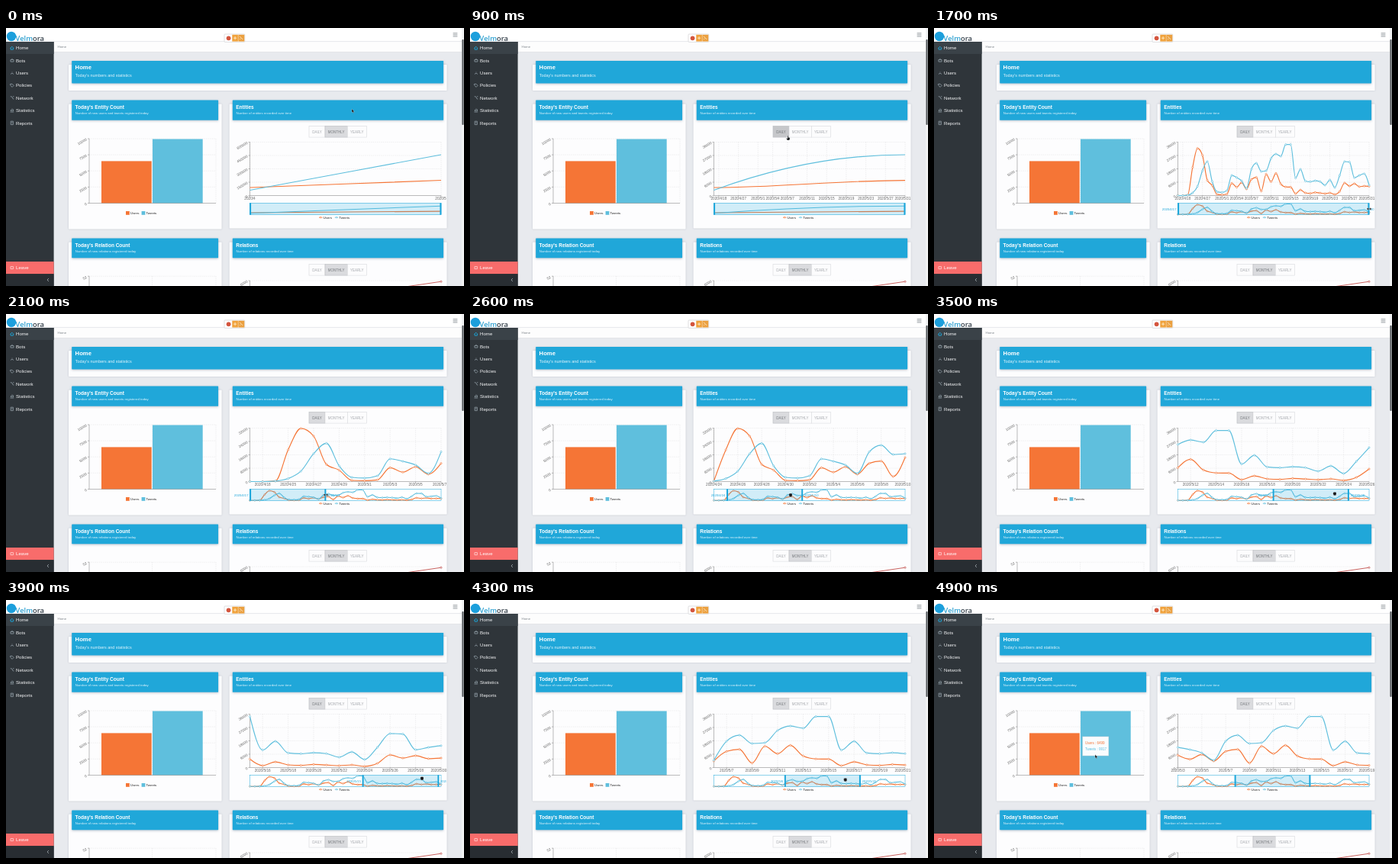
These frames come from a looping animation (600x338 px, 5 s). An HTML page:

```html
<!DOCTYPE html>
<html lang="en">
<head>
<meta charset="utf-8">
<title>Dashboard</title>
<style>
  html, body { margin: 0; width: 100%; height: 100%; overflow: hidden; background: #e8eaee; }
  svg { display: block; width: 100vw; height: 100vh; font-family: "Liberation Sans", Arial, sans-serif; }
  .card { fill: #fdfdfe; filter: drop-shadow(0 .5px 1px rgba(60, 70, 90, .22)); }
  .head { fill: #20a7d9; filter: drop-shadow(0 1.5px 1.5px rgba(40, 60, 90, .3)); }
  .title { fill: #fff; font-weight: bold; }
  .sub { fill: #e4f5fc; }
  .grid { stroke: #d3d3d6; stroke-width: .4; stroke-dasharray: 1.3 1.3; fill: none; }
  .axis { stroke: #777; stroke-width: .5; fill: none; }
  .tick { fill: #666; font-size: 4.7px; }
  .key { fill: #222; font-size: 4.4px; }
  .icon { fill: none; stroke: #8a969e; stroke-width: .9; }
</style>
</head>
<body>
<svg viewBox="0 0 600 338" preserveAspectRatio="none">
  <g id="page"></g>
  <g id="live"></g>
</svg>
<script>
const ORANGE = '#f57536', BLUE = '#5fbfdd', ACCENT = '#1ba6da';
const LOOP = 5000, STEP = 100;
const X0 = 319.5, X1 = 570, Y0 = 219.5, Y1 = 149.5;

// Daily counts in thousands
const users = [0, 0, .3, 19, 31.8, 27.2, 10.3, 6.8, .7, .5, 1, 8.3, 5.6, 8.8, 4.4, 10.9, 12.3, 3, 14.4, 9.3,
  15, 7.8, 5.8, 5.7, 1.3, 3.8, 1.8, 1.5, 2.1, 1.7, 1.3, 1.8, .8, 2.8, 8.5, 6.4, 8, 6, 6.4, 6.2];
const tweets = [0, 0, .3, 1.8, 6.2, 16.7, 22.9, 9.4, 2.5, 2.1, 3.4, 13.6, 12.1, 9.9, 4.9, 17.8, 21.8, 16.2, 16.7, 25,
  28, 26.5, 34.4, 34.4, 11.8, 17.7, 9.8, 9.3, 10, 9.4, 7, 10.5, 5.4, 13.6, 22.9, 22.6, 12, 13.6, 14.7, 7];
const LAST = users.length - 1;
const monthly = [[90, 171], [60, 459]];
const daily = [users, tweets];

const lerp = (a, b, k) => a + (b - a) * k;
const clamp = (v, a, b) => Math.min(b, Math.max(a, v));
const ease = k => k * k * (3 - 2 * k);

// keys: rows of [time, value, value, ...]
function track(keys, t) {
  let i = 0;
  while (i < keys.length - 2 && t >= keys[i + 1][0]) i++;
  const a = keys[i], b = keys[i + 1], k = clamp((t - a[0]) / (b[0] - a[0]), 0, 1);
  return a.slice(1).map((v, j) => lerp(v, b[j + 1], k));
}

const rect = (x, y, w, h, fill, more = '') =>
  `<rect x="${x}" y="${y}" width="${w}" height="${h}" fill="${fill}" ${more}/>`;
const text = (x, y, s, more = '') => `<text x="${x}" y="${y}" ${more}>${s}</text>`;
const path = (d, more) => `<path d="${d}" ${more}/>`;
const tilted = (x, y, s) => text(0, 0, s, `class="tick" text-anchor="end" transform="translate(${x} ${y}) rotate(-30)"`);

function card(x, y, w, h, headH, title, sub, big) {
  const ty = y + (big ? 11 : 11.3), sy = big ? y + 21.2 : y + 18.2;
  return rect(x, y + 5, w, h, '#fff', 'class="card" rx="1"') +
    rect(x + 4.2, y, w - 8.7, headH, '', 'class="head" rx=".6"') +
    text(x + 8.6, ty, title, `class="title" font-size="${big ? 7.7 : 6.5}"`) +
    text(x + 8.8, sy, sub, `class="sub" font-size="${big ? 5.44 : 4.35}"`);
}

function buttons(y, on, hover) {
  return [['DAILY', 397, 21], ['MONTHLY', 418, 29.3], ['YEARLY', 447.3, 25]].map(([s, x, w], i) =>
    rect(x, y, w, 14.6, i === on ? (hover ? '#c6c7ca' : '#dadbde') : '#fcfcfd',
      `stroke="${i === on ? '#b9bcc0' : '#d9dbde'}" stroke-width=".6"`) +
    text(x + w / 2, y + 9, s, `text-anchor="middle" font-size="4.5" fill="${i === on ? '#74777b' : '#a5a8ac'}"`)
  ).join('');
}

function sidebar() {
  const marks = [
    'M5.5 26.5L7.8 24.2L10 26.5M6.2 26v2.2h3.2v-2.2',
    'M6 41.5h4v2.6h-4zM8 41.5v-1.6',
    'M6 60.5q2-3 4 0M8 57.6v.6',
    'M5.6 73.4h2.6l2 2l-2 2l-2.6-2.4z',
    'M5.8 89.8h1.6l2 3.2h1M9 89.8h1.4',
    'M5.6 110h4.6M6.5 109v-2M8 109v-3.4M9.5 109v-2.5',
    'M6.2 122.2h3.2v4.4h-3.2zM7 124h1.6'
  ];
  return rect(0, 18, 62.6, 320, '#2f353a') + rect(0, 18, 62.6, 16, '#3a4248') +
    ['Home', 'Bots', 'Users', 'Policies', 'Network', 'Statistics', 'Reports'].map((s, i) =>
      text(13, 28.1 + i * 16.4, s, 'font-size="6.15" fill="#f4f5f6"') +
      path(marks[i], `class="icon" ${i ? '' : `style="stroke:${ACCENT}"`}`)).join('') +
    rect(0, 306, 62.6, 16.2, '#f86c6b') + text(13, 316.3, 'Leave', 'font-size="6.15" fill="#fff"') +
    path('M6 312.6h3.6v3h-3.6z', 'fill="none" stroke="#ffc9c8" stroke-width=".9"') +
    rect(0, 322.2, 62.6, 15.8, '#282d32') +
    path('M56 328l-2 2l2 2', 'fill="none" stroke="#a3abb0" stroke-width=".8"');
}

function barChart() {
  let s = path('M191.5 145V229.5M275 145V229.5' + [0, 1, 2, 3].map(i => `M109 ${145 + i * 21.1}H275`).join(''), 'class="grid"');
  s += rect(125, 174.4, 65.7, 55.1, ORANGE) + rect(192, 145.5, 65.7, 84, BLUE);
  s += path('M109 145V229.5H275' + [0, 1, 2, 3, 4].map(i => `M107 ${145 + i * 21.12}h2`).join(''), 'class="axis"');
  [10000, 7500, 5000, 2500, 0].forEach((v, i) => s += tilted(106.3, 147 + i * 21.12, v));
  return s + rect(157, 240, 4.8, 4.8, ORANGE) + text(163, 244, 'Users', 'class="key"') +
    rect(177.6, 240, 4.8, 4.8, BLUE) + text(183.4, 244, 'Tweets', 'class="key"');
}

function page() {
  let s = rect(0, 0, 600, 338, '#e8eaee') + rect(0, 0, 600, 17.6, '#fff') + rect(62.6, 17.6, 537.4, .5, '#d4d8dc') +
    rect(62.6, 18.1, 537.4, 13.4, '#fdfdfd') + rect(62.6, 31.2, 537.4, .5, '#d4d8dc') +
    text(67.5, 26.2, 'Home', 'font-size="4.4" fill="#7d848a"');
  s += '<circle cx="7" cy="11" r="6.2" fill="#1c9fdc"/>' +
    '<text x="12.6" y="16.8" font-size="9.3" font-weight="600" font-family="Open Sans, sans-serif" fill="#2a9fd0">Velm<tspan fill="#35414b">ora</tspan></text>';
  s += path('M585.6 6.8h5.8M585.6 8.9h5.8M585.6 11h5.8', 'stroke="#8b9197" stroke-width=".9"');
  s += rect(286, 8, 26.8, 10.4, '#fff', 'rx="1" stroke="#c9cbce" stroke-width=".6"') +
    '<circle cx="291.6" cy="13.3" r="2.9" fill="#d4553e"/>' +
    rect(296.3, 8.8, 7.6, 8.8, '#f0a23c') + rect(304.3, 8.8, 8, 8.8, '#eba040') +
    path('M300.1 11v4.4M298 13.2h4.2M306.2 11l4 4M306.2 15l1.2-1.2', 'stroke="#fff3d8" stroke-width=".8"');
  s += sidebar();
  s += card(82, 43, 495.6, 34, 29.4, 'Home', 'Today\'s numbers and statistics', true) +
    card(82, 94.5, 200.6, 164, 26.3, 'Today\'s Entity Count', 'Number of new users and tweets registered today') +
    card(292.6, 94.5, 285, 163, 26.3, 'Entities', 'Number of entities recorded over time') +
    card(82, 275.4, 200.6, 90, 25.8, 'Today\'s Relation Count', 'Number of new relations registered today') +
    card(292.6, 275.4, 285, 90, 25.8, 'Relations', 'Number of relations recorded over time');
  s += barChart() + buttons(309.5, 1);
  s += path('M109 325.2H275M191.5 325.2V338M275 325.2V338M319.5 331H570M570 331V338', 'class="grid"') +
    path('M109 325.2V338M107 325.2h2M319.5 331V338M317.5 331h2', 'class="axis"') +
    tilted(106.3, 327.4, '52') + tilted(317, 333, '6000') +
    path('M526 338.6L570 332.2', 'stroke="#c2504c" stroke-width=".9" fill="none"') +
    '<circle cx="570" cy="332.2" r="1.1" fill="#fff" stroke="#c2504c" stroke-width=".7"/>';
  [[410, ORANGE, 'Users'], [430.8, BLUE, 'Tweets']].forEach(([x, c, name]) => {
    s += path(`M${x} 248.2h4.4`, `stroke="${c}" stroke-width=".8"`) +
      `<circle cx="${x + 2.2}" cy="248.2" r=".9" fill="#fff" stroke="${c}" stroke-width=".6"/>` +
      text(x + 5.4, 249.8, name, 'class="key"');
  });
  return s + rect(597, 0, 3, 338, '#f1f2f3') + rect(597.4, 15, 2.2, 112, '#55595d', 'rx="1"');
}

// Monotone cubic through the points
function curve(p) {
  const n = p.length, m = [], h = [], g = [];
  for (let i = 0; i < n - 1; i++) {
    h[i] = p[i + 1][0] - p[i][0];
    g[i] = (p[i + 1][1] - p[i][1]) / h[i];
  }
  for (let i = 1; i < n - 1; i++) {
    const mid = (g[i - 1] * h[i] + g[i] * h[i - 1]) / (h[i - 1] + h[i]);
    m[i] = (Math.sign(g[i - 1]) + Math.sign(g[i])) * Math.min(Math.abs(g[i - 1]), Math.abs(g[i]), Math.abs(mid) / 2);
  }
  m[0] = n > 2 ? (3 * g[0] - m[1]) / 2 : g[0];
  m[n - 1] = n > 2 ? (3 * g[n - 2] - m[n - 2]) / 2 : g[0];
  let d = `M${p[0][0].toFixed(2)} ${p[0][1].toFixed(2)}`;
  for (let i = 0; i < n - 1; i++) {
    const k = h[i] / 3, [x, y] = p[i], [u, v] = p[i + 1];
    d += 'C' + [x + k, y + k * m[i], u - k, v - k * m[i + 1], u, v].map(a => a.toFixed(2)).join(' ');
  }
  return d;
}

function plot(data, top, bottom, max) {
  return data.map((v, i) => [lerp(X0, X1, i / (data.length - 1)), lerp(bottom, top, v / max)]);
}

function series(p, color, width, r) {
  const dots = r ? p.map(([x, y]) => `<circle cx="${x.toFixed(2)}" cy="${y.toFixed(2)}" r="${r}"/>`).join('') : '';
  return path(curve(p), `fill="none" stroke="${color}" stroke-width="${width}"`) +
    `<g fill="#fff" stroke="${color}" stroke-width=".65">${dots}</g>`;
}

// Each new point grows out of the old point that shares its part of the list
function morph(old, now, k) {
  return now.map(([x, y], i) => {
    const [a, b] = old[Math.floor(i * old.length / now.length)];
    return [lerp(a, x, k), lerp(b, y, k)];
  });
}

function dayName(i) {
  if (i < 2) return '2020/4/' + (17 + i);
  return i < 9 ? '2020/4/' + (22 + i) : '2020/5/' + (i - 8);
}

// Keep labels from the right end while they fit
function dayTicks(lo, hi) {
  const out = [];
  let edge = 577.4;
  for (let i = hi; i >= lo; i--) {
    const x = lerp(X0, X1, (i - lo) / (hi - lo)), name = dayName(i);
    const half = (name.length - 2 + .05 - .95) * .556 * 4.7 / 2 + 2.6;
    const c = i === hi ? Math.min(x, edge - half) : x;
    if (c + half <= edge) {
      out.push([x, c, name]);
      edge = c - half - .2;
    }
  }
  return out;
}

const brushKeys = [[0, X0, X1], [1700, X0, X1], [2100, X0, 419], [2500, X0, 419], [3100, 421, 520],
  [3900, 467, 567], [4000, 467, 567], [4400, 394, 493], [5000, 394, 493]];
const mouseKeys = [[0, 453, 106], [200, 453, 106], [600, 416, 142], [1000, 416, 142], [1500, 570, 237], [1700, 570, 237],
  [2100, 419, 237], [2300, 419, 237], [2500, 403, 237], [3100, 505, 237], [3900, 545, 233.5], [4000, 545, 233.5],
  [4400, 474, 236], [4700, 225, 206], [4900, 211, 202.5], [5000, 211, 202.5]];

function cursor(x, y, t) {
  let d = 'M0 0V4.6L1.1 3.7L1.9 5.4L2.7 5L2 3.4H3.4Z';
  if (t >= 600 && t < 1200) d = 'M0 -1L.9 -1V1.2L3 1.8V3.6L2.2 5H-.4L-1.7 2.6L-1 2.2L0 3Z';
  else if (t >= 1500 && t < 2400) d = 'M-3.2 0L-1.2 -1.8V-.6H1.2V-1.8L3.2 0L1.2 1.8V.6H-1.2V1.8Z';
  else if (t >= 2400 && t < 4500) d = 'M-2 -1.6Q0 -2.6 2 -1.6V.8L1.3 2.4H-1.2L-2.2 .6Z';
  return path(d, `transform="translate(${x} ${y})" fill="#16191c" stroke="#fff" stroke-width=".25"`);
}

function live(t) {
  const byDay = t >= 800, k = byDay ? ease(clamp((t - 900) / 600, .004, 1)) : 1;
  const [left, right] = track(brushKeys, t), [mx, my] = track(mouseKeys, t);
  const unit = (X1 - X0) / LAST;
  const lo = Math.floor((left - X0) / unit + .05), hi = Math.floor((right - X0) / unit + .05);
  const shown = byDay ? daily.map(d => d.slice(lo, hi + 1)) : monthly;
  const tick = byDay ? Math.ceil(Math.max(...shown.flat()) / 4) : 150;
  const ticks = byDay ? dayTicks(lo, hi) : [[X0, X0, '2020/4'], [X1, 569.5, '2020/5']];
  const colors = [ORANGE, BLUE], settled = byDay && k === 1;

  let s = buttons(128.5, byDay ? 0 : 1, byDay && t < 1200);
  const rows = [0, 1, 2, 3, 4].map(i => Y1 + i * 17.5);
  s += path(rows.slice(0, 4).map(y => `M${X0} ${y}H${X1}`).join('') +
    ticks.map(([x]) => `M${x.toFixed(2)} ${Y1}V${Y0}`).join(''), 'class="grid"');
  s += path(`M${X0} ${Y1}V${Y0}H${X1}` + rows.map(y => `M${X0 - 2} ${y}h2`).join('') +
    ticks.map(([x]) => `M${x.toFixed(2)} ${Y0}v2`).join(''), 'class="axis"');
  rows.forEach((y, i) => s += tilted(317, y + 2, (4 - i) * tick * 1000));
  ticks.forEach(([, x, name]) => s += text(x.toFixed(2), 225.2, name, 'class="tick" text-anchor="middle"'));

  shown.forEach((d, i) => {
    let p = plot(d, Y1, Y0, tick * 4);
    if (byDay && k < 1) p = morph(plot(monthly[i], Y1, Y0, 600), p, k);
    s += series(p, colors[i], 1.15, settled ? 1.1 : 0);
  });

  // Range selector
  s += rect(X0, 229.3, X1 - X0, 15.4, '#fff', `stroke="${ACCENT}" stroke-width=".5"`);
  (byDay ? daily : monthly).forEach((d, i) => {
    let p = plot(d, 229.8, 244.2, byDay ? 36 : 600);
    if (byDay && k < 1) p = morph(plot(monthly[i], 229.8, 244.2, 600), p, k);
    s += series(p, colors[i], 1.1, settled ? .9 : 0);
  });
  s += rect(left, 229.3, right - left, 15.4, ACCENT, 'fill-opacity=".2"') +
    rect(left - .4, 229.3, 2, 15.4, ACCENT) + rect(right - 1.6, 229.3, 2, 15.4, ACCENT);
  if (t >= 1500 && t < 4500) {
    s += `<svg x="290" y="225" width="286.6" height="24" viewBox="290 225 286.6 24" font-size="4.2" fill="${ACCENT}">` +
      text(left - 2, 238.6, dayName(lo), 'text-anchor="end"') + text(right + 2, 238.6, dayName(hi)) + '</svg>';
  }

  if (t >= 4700 && mx < 275) {
    const y = my - 23.5;
    s += rect(194.8, y, 34, 25, '#fff', 'fill-opacity=".96" stroke="#d2d4d6" stroke-width=".5"') +
      `<g font-size="4.5">${text(198, y + 9.6, 'Users : 6499', `fill="${ORANGE}"`)}${text(198, y + 18.3, 'Tweets : 9917', `fill="${BLUE}"`)}</g>`;
  }
  return s + cursor(mx, my, t);
}

const stage = document.getElementById('live');
document.getElementById('page').innerHTML = page();
const start = performance.now();
let last = -1;
function draw(now) {
  const t = Math.floor(Math.max(0, now - start) % LOOP / STEP) * STEP;
  if (t !== last) {
    stage.innerHTML = live(t);
    last = t;
  }
  requestAnimationFrame(draw);
}
draw(start);
</script>
</body>
</html>
```
